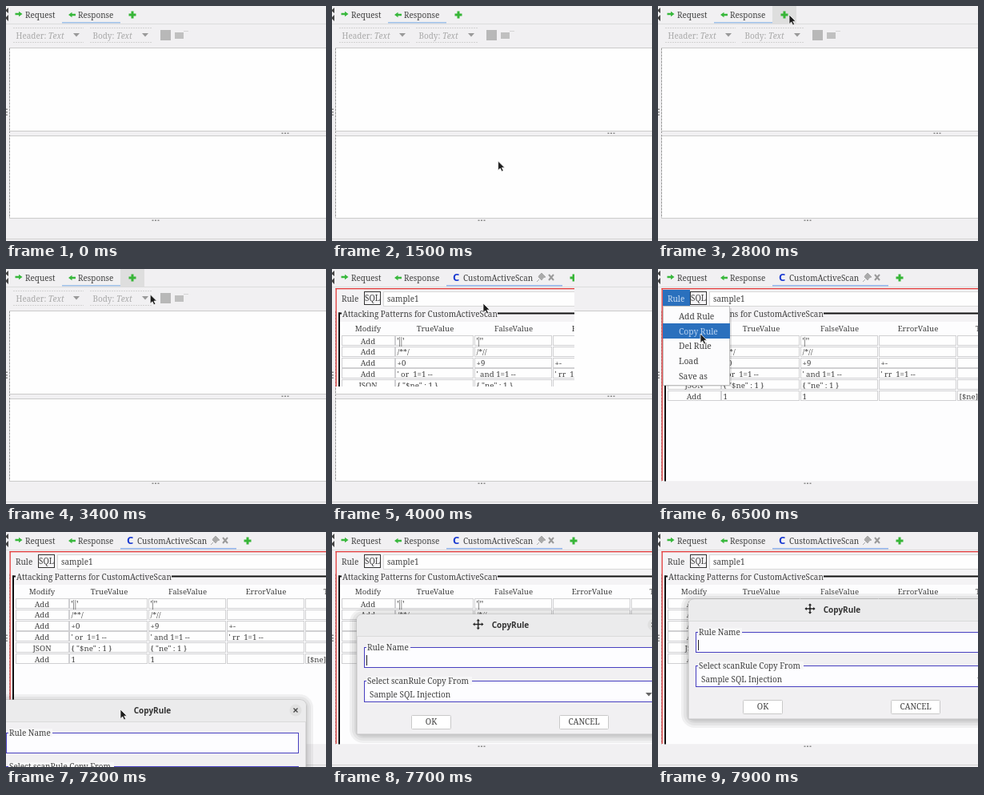
Animation, 400 px wide and 294 px high, one loop 8000 ms. Source, as an HTML page:

```html
<!DOCTYPE html>
<html lang="en">
<head>
<meta charset="utf-8">
<title>Copy rule</title>
<style>
html, body { margin: 0; width: 100%; height: 100%; overflow: hidden; background: #f1f0f2; }
svg { display: block; width: 400px; height: 294px; }
text { font: 9.95px "Noto Serif", serif; fill: #404040; white-space: pre; }
.table text { font-size: 9.65px; }
.table .bars { font: 11.5px "Liberation Serif", serif; }
.item { font-size: 10.3px; }
.muted { fill: #a9a9a9; }
.title { font: bold 10px "Noto Sans", sans-serif; fill: #333; }
.letter { font: bold 13px "Noto Sans", sans-serif; fill: #1838d0; }
</style>
</head>
<body>
<svg id="stage" viewBox="0 0 400 294"></svg>
<script>
const LOOP = 8000;
const PANEL = '#f1f0f2';
const BLUE = '#2a70bd';
const stage = document.getElementById('stage');

// Markup helpers; text is placed by its vertical middle.
const rect = (x, y, w, h, fill, extra = '') =>
  `<rect x="${x}" y="${y}" width="${w}" height="${h}" fill="${fill}" ${extra}/>`;
const frame = (x, y, w, h, stroke, fill = '#fefefe', extra = '') =>
  rect(x + .5, y + .5, w - 1, h - 1, fill, `stroke="${stroke}" ${extra}`);
const path = (d, fill, extra = '') => `<path d="${d}" fill="${fill}" ${extra}/>`;
const label = (x, y, s, extra = '') => `<text x="${x}" y="${y + 3.4}" ${extra}>${s}</text>`;
const centred = (x, y, s, extra = '') => label(x, y, s, `text-anchor="middle" ${extra}`);
const group = (id, body, extra = '') => `<g id="${id}" ${extra}>${body}</g>`;
const grip = (x, y, dx, dy) =>
  [-1, 0, 1].map(i => rect(x + i * dx, y + i * dy, 2, 1.5, '#8a8a8a')).join('');
const plus = x => path(`M${x - 1.5} 6.5h3v3h3v3h-3v3h-3v-3h-3v-3h3z`, '#37b537');
const arrow = (x, y, dir) =>
  path(`M${x} ${y - 1.3}h${4.5 * dir}v-2l${4.5 * dir} 3.3l${-4.5 * dir} 3.3v-2h${-4.5 * dir}z`, '#38b83c');
const dropArrow = (x, y, fill) => path(`M${x - 4} ${y - 2}h8l-4 4.5z`, fill);

function baseView() {
  return rect(0, 0, 400, 294, PANEL)
    + path('M3 2v7l-4-3.5zM3 11v8l-4-4z', '#444')
    + rect(0, 22, 400, 1, '#dcdcdc')
    + frame(4, 52, 410, 105, '#cbcbcb') + frame(4, 162, 410, 104, '#cbcbcb')
    + path('M4.5 53V265', 'none', 'stroke="#999" stroke-dasharray="2 2"')
    + grip(348, 158.5, 3.5, 0) + grip(186, 267.5, 3.5, 0) + grip(0, 132, 0, 3.5)
    + rect(0, 291, 400, 1, '#d2d2d2');
}

function tabs() {
  return arrow(11.5, 10, 1) + label(24, 11.5, 'Request')
    + arrow(87, 11, -1) + label(90, 12, 'Response');
}

function responseView() {
  const combo = (x, w, name) =>
    path(`M${x} 27.5h${w}M${x} 45.5h${w}`, 'none', 'stroke="#d2d2d2" stroke-dasharray="2 1"')
    + label(x + 3.5, 37.5, `${name}: <tspan font-style="italic">Text</tspan>`, 'class="muted"')
    + dropArrow(x + w - 9, 36, '#999');
  return group('hover', rect(143, 0, 30, 22, '#dedede'))
    + rect(70, 20, 73, 1.5, '#9dc0e8') + plus(158)
    + combo(9, 88, 'Header') + combo(105, 78, 'Body')
    + rect(193, 30, 13, 13, '#b8b8b8') + rect(211, 33, 11, 8, '#c0c0c0') + rect(222, 31, 6, 1, '#d4d4d4');
}

function tableView() {
  const columns = [12, 79, 178, 276, 374];
  const widths = [67, 98, 97, 97, 97];
  const rows = [
    ['Add', "'||'", "'|''"],
    ['Add', '/**/', '/*//'],
    ['Add', '+0', '+9', '+-'],
    ['Add', "' or  1=1 --", "' and 1=1 --", "' rr  1=1 --"],
    ['JSON', '{ "$ne" : 1 }', '{ "ne" : 1 }'],
    ['Add', '1', '1', '', '[$ne]']
  ];
  const heads = ['Modify', 'TrueValue', 'FalseValue', 'ErrorValue']
    .map((s, i) => centred([45, 129, 227, 325][i], 74.5, s)).join('');
  const cells = rows.map((row, r) => columns.map((x, c) => {
    const y = 83 + r * 13.8, text = row[c] || '';
    const style = text.includes('|') ? 'class="bars"' : '';
    return frame(x, Math.round(y), widths[c], 13, '#d0d0d2')
      + (c ? label(x + 2.5, y + 7.2, text, style) : centred(45, y + 7.2, text));
  }).join('')).join('');
  return `<g class="table">${heads}${label(397, 74.5, 'T')}${cells}</g>`;
}

function scanView() {
  return rect(0, 0, 400, 22, PANEL) + path('M3 2v7l-4-3.5zM3 11v8l-4-4z', '#444')
    + rect(143, 20, 145, 1.5, '#8fb2ea')
    + tabs() + label(151, 11.2, 'C', 'class="letter"') + label(164, 11.5, 'CustomActiveScan')
    + path('M259 8l3-3 5 5-3 1-2 3-4-4zM259 13l-3 3', '#aaa', 'stroke="#aaa"')
    + path('M271 7l6 7m0-7l-6 7', 'none', 'stroke="#999" stroke-width="2"') + plus(302)
    + rect(5, 24, 395, 242, '#f4f3f5') + rect(10, 66, 390, 199, '#fdfdfe')
    + rect(4.5, 24, 396, 1.3, '#e23a3a') + rect(4.5, 24, 1.3, 241, '#e23a3a')
    + label(12, 38, 'Rule') + frame(64, 28, 345, 19, '#d8d8d8') + label(69, 38, 'sample1')
    + frame(40, 28, 21, 17, '#333', '#f6f5f7') + label(41, 37, 'SQL')
    + rect(8, 54.5, 2, 211, '#111') + rect(8, 54.5, 4, 2, '#111') + rect(207, 54.5, 193, 2, '#111')
    + label(13, 57, 'Attacking Patterns for CustomActiveScan')
    + tableView();
}

const menuItems = ['Add Rule', 'Copy Rule', 'Del Rule', 'Load', 'Save as'];
function menuView() {
  return rect(6, 26, 34, 20, BLUE) + label(12, 38, 'Rule', 'style="fill:#cfe0f5"')
    + rect(8, 49, 84, 98, '#000', 'opacity=".1"') + frame(6, 46, 84, 100, '#c0c0c0', '#fcfcfd')
    + rect(6, 0, 84, 19, BLUE, 'id="pick"')
    + menuItems.map((s, i) => label(26, 59.5 + i * 18.7, s, 'class="item"')).join('');
}

function dialogView() {
  const shadow = [9, 6, 3, 1].map(d =>
    rect(-d, -d + 2, 384 + 2 * d, 150 + 2 * d, '#000', `rx="${8 + d}" opacity=".05"`)).join('');
  const field = (y, h, name, w) => frame(9, y, 366, h, '#473fc0', '#fdfdff')
    + rect(12, y - 5, w, 10, '#f7f7f8') + label(13, y + 1, name);
  const button = (x, w, s) => frame(x, 126, w, 18, '#c9c9c9', '#fff', 'rx="1"') + centred(x + w / 2, 135, s);
  return shadow
    + path('M0 150V8Q0 0 8 0H376Q384 0 384 8V150z', PANEL, 'stroke="#bbb" stroke-width=".8"')
    + path('M0 27V8Q0 0 8 0H376Q384 0 384 8V27z', '#ebebec') + rect(0, 27, 384, 1, '#dadada')
    + centred(192, 14, 'CopyRule', 'class="title"')
    + '<circle cx="371" cy="13" r="7.5" fill="#e0e0e0"/>'
    + path('M368.5 10.5l5 5m0-5l-5 5', 'none', 'stroke="#444" stroke-width="1.3"')
    + field(41, 26, 'Rule Name', 55) + rect(12, 51, 1, 13, '#222', 'id="caret"')
    + field(83, 27, 'Select scanRule Copy From', 132)
    + label(16, 101, 'Sample SQL Injection') + dropArrow(365, 100, '#666')
    + button(68, 50, 'OK') + button(253, 62, 'CANCEL');
}

stage.innerHTML = `<clipPath id="part"><rect id="reveal" height="147" width="303"/></clipPath>`
  + baseView() + tabs() + responseView()
  + group('scan', scanView(), 'clip-path="url(#part)"')
  + group('menu', menuView()) + group('dialog', dialogView())
  + group('pointer', path('M0 0V11.5L2.7 9L4.6 13L6.6 12L4.7 8.2H8.2z', '#1d1d1d', 'stroke="#fff" stroke-width=".7"'))
  + group('mover', path('M0-7l2.6 3H1v3h3v-1.6L7 0 4 2.6V1H1v3h1.6L0 7l-2.6-3H-1V1h-3v1.6L-7 0l3-2.6V-1h3v-3h-1.6z', '#222', 'stroke="#fff" stroke-width=".5"'));

const get = id => document.getElementById(id);
const parts = Object.fromEntries(
  ['hover', 'reveal', 'scan', 'menu', 'pick', 'dialog', 'caret', 'pointer', 'mover'].map(id => [id, get(id)]));
const items = [...document.querySelectorAll('.item')];
const show = (part, on) => part.setAttribute('display', on ? 'inline' : 'none');
const move = (part, x, y) => part.setAttribute('transform', `translate(${x} ${y})`);

// Pointer stops: time, x, y
const route = [
  [1000, 224, 228], [1900, 196, 170], [2600, 164, 11], [3100, 164, 11], [3600, 189, 43],
  [4200, 189, 43], [4900, 41, 39], [5100, 41, 39], [5400, 22, 37], [5700, 22, 37],
  [6000, 42, 58], [6300, 53, 81], [6650, 53, 81], [7150, 143, 222], [7250, 143, 222], [7850, 190, 96]
];
function pointerAt(t) {
  const next = route.findIndex(stop => stop[0] > t);
  if (next < 0) return route[route.length - 1].slice(1);
  if (!next) return route[0].slice(1);
  const [t0, x0, y0] = route[next - 1], [t1, x1, y1] = route[next];
  const k = (t - t0) / (t1 - t0), e = k * k * (3 - 2 * k);
  return [x0 + (x1 - x0) * e, y0 + (y1 - y0) * e];
}

function draw(t) {
  const [x, y] = pointerAt(t);
  const dragging = t >= 7250;
  show(parts.hover, t >= 2500 && t < 3500);
  show(parts.scan, t >= 3700);
  parts.reveal.setAttribute('width', t < 4200 ? 303 : 400);
  parts.reveal.setAttribute('height', t < 4200 ? 147 : 294);

  show(parts.menu, t >= 5500 && t < 6650);
  const picked = y < 50 ? -1 : Math.floor((y - 49.5) / 18.7);
  show(parts.pick, picked >= 0);
  parts.pick.setAttribute('y', Math.round(49.5 + picked * 18.7));
  items.forEach((item, i) => item.style.fill = i === picked ? '#b9d3f2' : '');

  show(parts.dialog, t >= 6900);
  move(parts.dialog, dragging ? Math.round(x) - 152 : -9, dragging ? Math.round(y) - 12 : 210);
  show(parts.caret, t >= 7600);

  show(parts.pointer, t >= 1000 && !dragging);
  show(parts.mover, dragging);
  move(parts.pointer, x, y);
  move(parts.mover, x, y);
}

const start = performance.now();
function tick(now) {
  draw(Math.max(0, now - start) % LOOP);
  requestAnimationFrame(tick);
}
draw(0);
requestAnimationFrame(tick);
</script>
</body>
</html>
```
